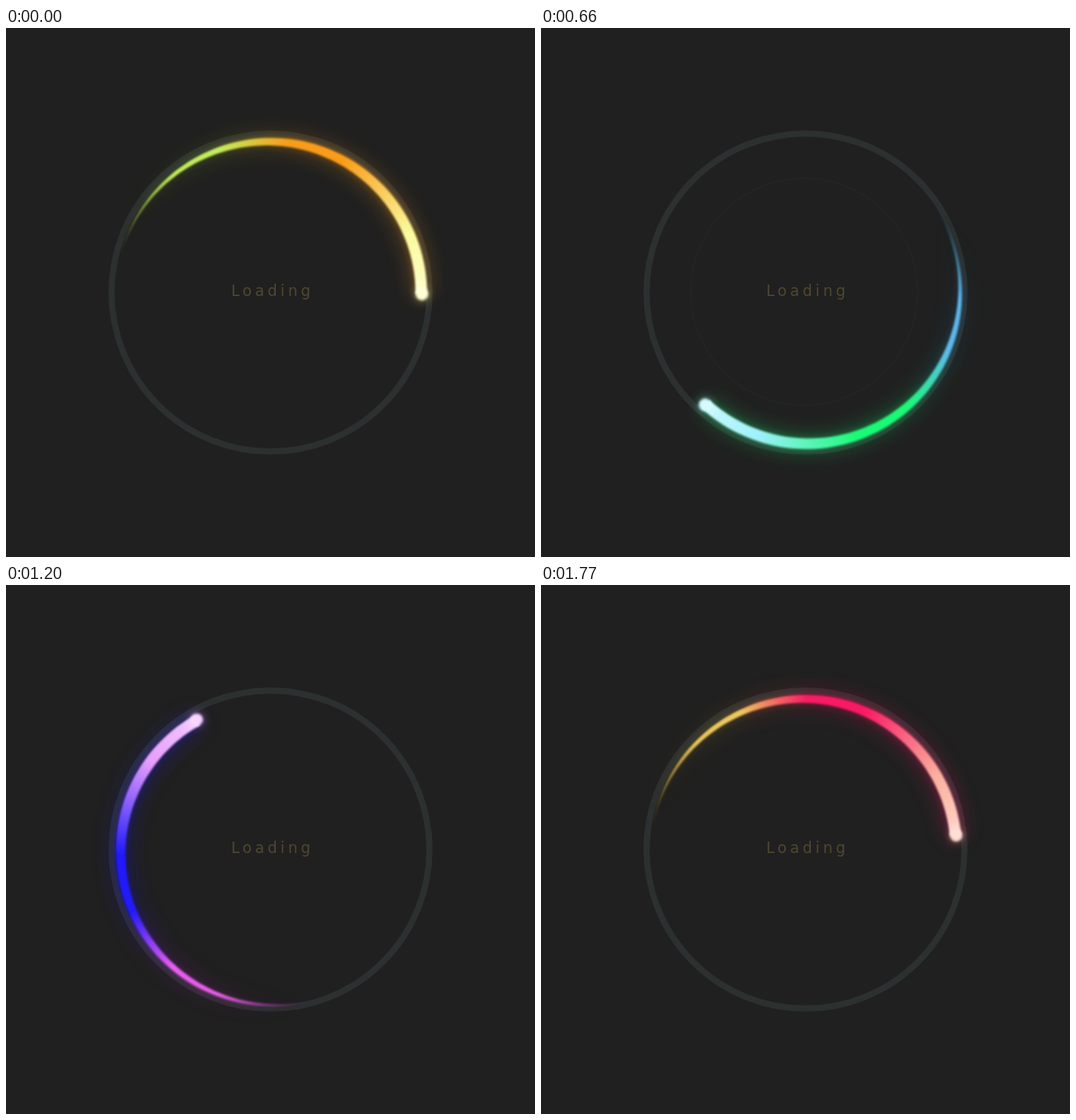
An HTML page with a canvas for the animation above (1800 ms loop, 600 by 600 pixels).

```html
<!DOCTYPE html>
<html lang="en">
<head>
<meta charset="utf-8">
<title>Loading</title>
<style>
  html, body { margin: 0; width: 100%; height: 100%; overflow: hidden; background: #202020; }
  canvas, svg { position: absolute; left: 0; top: 0; width: 600px; height: 600px; }
  text { font: 17px "DejaVu Sans", Verdana, sans-serif; letter-spacing: 3.8px; fill: #4f4730; }
</style>
</head>
<body>
<canvas id="stage" width="600" height="600"></canvas>
<svg viewBox="0 0 600 600"><text x="255.4" y="304.3">Loading</text></svg>
<script>
const ctx = document.getElementById('stage').getContext('2d');
const LOOP = 1800, STEP = 30;
const CX = 301, CY = 301, OUTER = 176.5, WIDTH = 13, SPAN = 168;
const TAU = Math.PI * 2, rad = deg => deg * Math.PI / 180;

// Hues of the trail over time
const TIMES = [0, 210, 480, 870, 1200, 1590, 1770, 1800];
const PEAK = [35, 62, 113, 182, 242, 304, 340, 346];
const TAIL = [78, 125, 170, 240, 298, 360, 405, 411];
const PALE = [60, 108, 150, 228, 288, 340, 372, 378];

// Ripple strength by radius
const RADII = [95, 98.5, 105, 117, 134, 140];
const GLINT = [0, 0.055, 0.07, 0.025, 0.02, 0];

function lookup(x, xs, ys) {
  if (x <= xs[0]) return ys[0];
  for (let i = 1; i < xs.length; i++) {
    if (x <= xs[i]) {
      return ys[i - 1] + (ys[i] - ys[i - 1]) * (x - xs[i - 1]) / (xs[i] - xs[i - 1]);
    }
  }
  return ys[ys.length - 1];
}

const hsl = (h, s, l, a = 1) => `hsla(${h % 360}, ${s}%, ${l}%, ${a})`;

function ring(x, y, r, width, color) {
  ctx.beginPath();
  ctx.arc(x, y, r, 0, TAU);
  ctx.lineWidth = width;
  ctx.strokeStyle = color;
  ctx.stroke();
}

function disc(x, y, r, color) {
  ctx.beginPath();
  ctx.arc(x, y, r, 0, TAU);
  ctx.fillStyle = color;
  ctx.fill();
}

// Crescent with a fixed outer edge, tapering away behind the head
function crescent(head) {
  const path = new Path2D();
  const put = (r, back) => {
    const a = rad(head - back);
    path.lineTo(CX + r * Math.cos(a), CY + r * Math.sin(a));
  };
  for (let d = 0; d <= SPAN; d += 2) put(OUTER, d);
  for (let d = SPAN; d >= 0; d -= 2) {
    put(OUTER - WIDTH * Math.sin(Math.PI / 2 * (1 - d / SPAN)), d);
  }
  path.closePath();
  return path;
}

// Stops are [degrees behind the head, color]
function sweep(head, stops) {
  const g = ctx.createConicGradient(rad(head - SPAN), CX, CY);
  for (const [d, color] of stops) g.addColorStop((SPAN - d) / 360, color);
  return g;
}

function blurred(px, alpha, paint) {
  ctx.save();
  ctx.filter = `blur(${px}px)`;
  ctx.globalAlpha = alpha;
  paint();
  ctx.restore();
}

function ripples(t) {
  for (const lag of [0, 129, 220]) {
    const r = 98.5 + 0.1315 * (t - 210 - lag);
    const a = lookup(r, RADII, GLINT);
    if (a > 0) ring(298.5, 299.2, r, 1.5, `rgba(205, 220, 220, ${a})`);
  }
}

function trail(t) {
  const head = t * 0.2 + 0.3;
  const peak = lookup(t, TIMES, PEAK);
  const tail = lookup(t, TIMES, TAIL);
  const pale = lookup(t, TIMES, PALE);
  const path = crescent(head);
  const hx = CX + 170.8 * Math.cos(rad(head));
  const hy = CY + 170.8 * Math.sin(rad(head));

  const glow = sweep(head, [
    [SPAN, hsl(tail, 80, 50, 0)],
    [120, hsl(tail, 80, 50, 0.7)],
    [80, hsl(peak, 95, 50)],
    [0, hsl(peak, 95, 55)]
  ]);
  const body = sweep(head, [
    [SPAN, hsl(tail, 70, 50, 0)],
    [150, hsl(tail, 70, 60, 0.5)],
    [130, hsl(tail, 78, 64)],
    [110, hsl(tail, 80, 65)],
    [84, hsl(peak, 94, 54)],
    [62, hsl(peak, 96, 54)],
    [24, hsl(pale, 90, 80)],
    [6, hsl(pale, 95, 87)],
    [0, hsl(pale, 100, 93)]
  ]);
  const fill = style => () => {
    ctx.fillStyle = style;
    ctx.fill(path);
  };

  blurred(12, 0.42, fill(glow));
  blurred(4, 0.3, fill(glow));
  blurred(5, 0.4, () => disc(hx, hy, 8, hsl(pale, 90, 75)));
  blurred(0.8, 1, fill(body));
  blurred(1.7, 1, () => disc(hx, hy, 7, hsl(pale, 100, 92)));
}

function draw(t) {
  ctx.fillStyle = '#202020';
  ctx.fillRect(0, 0, 600, 600);
  ring(300, 300, 180.3, 7, '#2d3030');
  ripples(t);
  trail(t);
}

const start = performance.now();
function tick() {
  const t = (performance.now() - start) % LOOP;
  draw(Math.floor(t / STEP) * STEP);
  requestAnimationFrame(tick);
}
tick();
</script>
</body>
</html>
```
